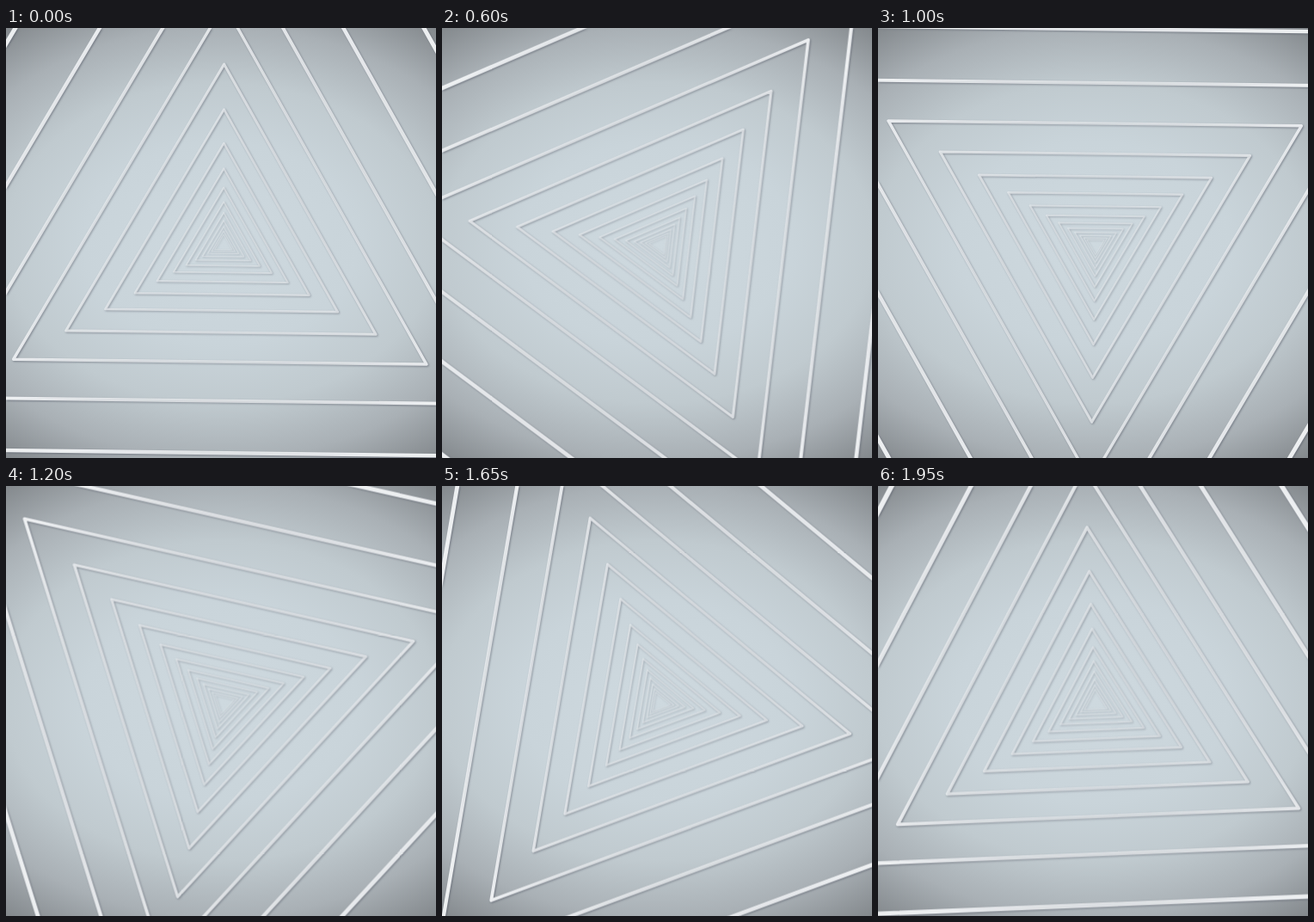
Write an HTML page without scripts that moves like this. It is 500 px wide and 500 px high and loops after 2 s.

```html
<!DOCTYPE html>
<html lang="en">
<head>
<meta charset="utf-8">
<title>Triangle tunnel</title>
<style>
  html, body { margin: 0; width: 100%; height: 100%; overflow: hidden; }
  body {
    background: radial-gradient(420px 310px at 50% 50%,
      #ced9df 0, #c9d4da 38%, #c0cacf 60%, #a9b0b5 81%, #84898d 100%);
  }
  svg {
    display: block;
    width: 100vw;
    height: 100vh;
    filter: blur(.75px) drop-shadow(1.7px 1.7px .8px rgb(92 98 110 / .75));
  }
  /* a small lead keeps each step clear of its boundary */
  .zoom { animation: zoom .5s step-end -5ms infinite; }
  /* nearer rings drift up and left of the vanishing point */
  .ring {
    --drift: calc(var(--k) * -.9px);
    translate: var(--drift) var(--drift);
    scale: var(--k);
    animation: spin 2s steps(40) -5ms infinite;
  }
  @keyframes spin {
    from { rotate: .7deg; }
    to { rotate: 120.7deg; }
  }
  /* grows by 4/3, the ratio between neighbours */
  @keyframes zoom {
    0% { transform: scale(1); }
    10% { transform: scale(1.0292); }
    20% { transform: scale(1.0592); }
    30% { transform: scale(1.0901); }
    40% { transform: scale(1.122); }
    50% { transform: scale(1.1547); }
    60% { transform: scale(1.1884); }
    70% { transform: scale(1.2231); }
    80% { transform: scale(1.2588); }
    90% { transform: scale(1.2955); }
    100% { transform: scale(1.3333); }
  }
</style>
</head>
<body>
<svg viewBox="0 0 500 500">
  <defs>
    <path id="tri" d="M0-100 86.6 50-86.6 50Z"/>
    <radialGradient id="fade" gradientUnits="userSpaceOnUse" cx="253" cy="252" r="300">
      <stop offset="0" stop-color="#fff" stop-opacity=".25"/>
      <stop offset=".12" stop-color="#fff" stop-opacity=".42"/>
      <stop offset=".4" stop-color="#fff" stop-opacity=".6"/>
      <stop offset=".7" stop-color="#fff" stop-opacity=".75"/>
      <stop offset="1" stop-color="#fff" stop-opacity=".95"/>
    </radialGradient>
    <mask id="depth" maskUnits="userSpaceOnUse" x="0" y="0" width="500" height="500">
      <rect width="500" height="500" fill="url(#fade)"/>
    </mask>
  </defs>
  <g mask="url(#depth)">
    <g transform="translate(253 252)" fill="none" stroke="#f3f5f7" stroke-linejoin="round">
      <g class="zoom">
        <use href="#tri" class="ring" style="--k:6.574" stroke-width=".75"/>
        <use href="#tri" class="ring" style="--k:4.93" stroke-width=".89"/>
        <use href="#tri" class="ring" style="--k:3.698" stroke-width="1.06"/>
        <use href="#tri" class="ring" style="--k:2.773" stroke-width="1.25"/>
        <use href="#tri" class="ring" style="--k:2.08" stroke-width="1.49"/>
        <use href="#tri" class="ring" style="--k:1.56" stroke-width="1.77"/>
        <use href="#tri" class="ring" style="--k:1.17" stroke-width="2.1"/>
        <use href="#tri" class="ring" style="--k:.8775" stroke-width="2.5"/>
        <use href="#tri" class="ring" style="--k:.658" stroke-width="2.97"/>
        <use href="#tri" class="ring" style="--k:.494" stroke-width="3.53"/>
        <use href="#tri" class="ring" style="--k:.37" stroke-width="4.19"/>
        <use href="#tri" class="ring" style="--k:.278" stroke-width="4.98"/>
        <use href="#tri" class="ring" style="--k:.208" stroke-width="5.9"/>
        <use href="#tri" class="ring" style="--k:.156" stroke-width="7"/>
        <use href="#tri" class="ring" style="--k:.117" stroke-width="8.3"/>
      </g>
    </g>
  </g>
</svg>
</body>
</html>
```
